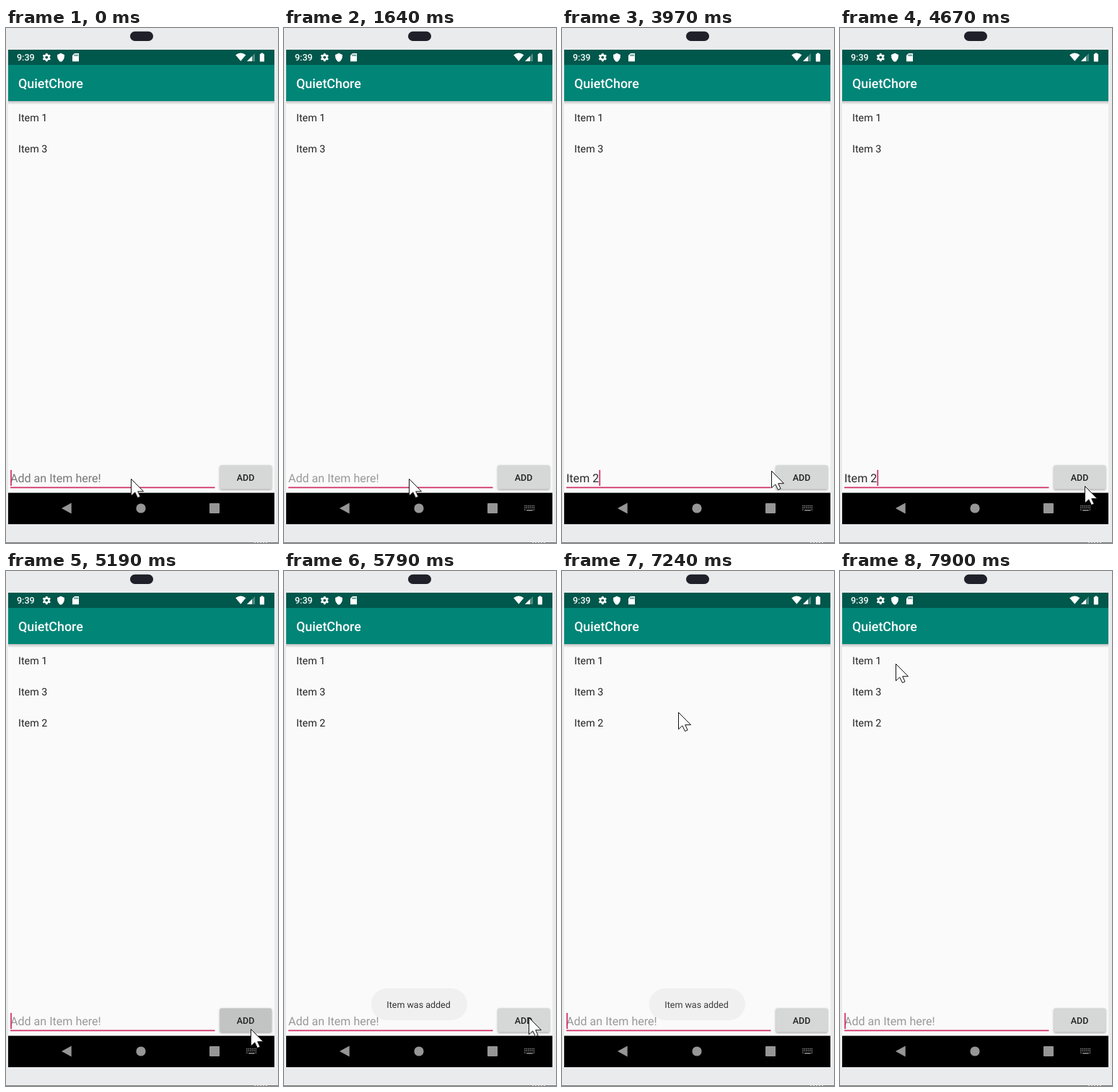
An HTML page with a canvas for the animation above (8 s loop, 377 by 712 pixels).

```html
<!DOCTYPE html>
<html lang="en">
<head>
<meta charset="utf-8">
<title>Todo list demo</title>
<style>
html, body { margin: 0; width: 100%; height: 100%; overflow: hidden; background: #eaebed; }
canvas { display: block; width: 377px; height: 712px; }
</style>
</head>
<body>
<canvas id="stage"></canvas>
<script>
const W = 377, H = 712, LOOP = 8000;
const canvas = document.getElementById('stage');
const ctx = canvas.getContext('2d');
const dpr = window.devicePixelRatio || 1;
canvas.width = W * dpr;
canvas.height = H * dpr;

const ACCENT = '#d02f62', GREY = '#969696';

// Event times in ms
const KEYBOARD = 150, TYPE = 1760, KEY_GAP = 140, DIGIT = 3640, TAP = 4890;
const ADDED = TAP + 300;
const BLINK = 500;
// The screen was sampled at a steady rate, so the pointer moves in steps.
const STEP = 132, PHASE = 110;

// Pointer route as [time, x, y]
const ROUTE = [
  [3450, 173, 623], [3720, 191, 611], [4090, 359, 612], [4590, 339, 633],
  [5660, 339, 633], [5786, 339, 617], [6046, 333, 453], [6310, 315, 320],
  [6710, 228, 249], [7898, 77, 128]
];

const clamp = v => Math.min(1, Math.max(0, v));
const mix = (a, b, k) => a + (b - a) * k;
// Rises over `fade` ms from `from` and falls back to 0 at `to`.
const pulse = (t, from, to, fade) => clamp((t - from) / fade) * clamp((to - t) / fade);

function pointerAt(t) {
  const s = Math.floor((t - PHASE) / STEP) * STEP + PHASE;
  const next = ROUTE.findIndex(key => key[0] > s);
  if (next === 0) return ROUTE[0].slice(1);
  if (next < 0) return ROUTE.at(-1).slice(1);
  const [t0, x0, y0] = ROUTE[next - 1], [t1, x1, y1] = ROUTE[next];
  const k = (s - t0) / (t1 - t0);
  return [Math.round(mix(x0, x1, k)), Math.round(mix(y0, y1, k))];
}

function typedAt(t) {
  if (t < TYPE || t >= ADDED) return '';
  if (t >= DIGIT) return 'Item 2';
  return 'Item '.slice(0, 1 + Math.floor((t - TYPE) / KEY_GAP));
}

// The caret restarts its blink on every key press and on the tap.
function caretOn(t) {
  const keys = Array.from('Item ', (_, i) => TYPE + i * KEY_GAP);
  const last = Math.max(...[0, ...keys, DIGIT, TAP].filter(key => key <= t));
  return Math.floor((t - last) / BLINK) % 2 === 0;
}

function rect(x, y, w, h, color) {
  ctx.fillStyle = color;
  ctx.fillRect(x, y, w, h);
}

function round(x, y, w, h, r, color) {
  ctx.fillStyle = color;
  ctx.beginPath();
  ctx.roundRect(x, y, w, h, r);
  ctx.fill();
}

function disc(x, y, r, color) {
  ctx.fillStyle = color;
  ctx.beginPath();
  ctx.arc(x, y, r, 0, Math.PI * 2);
  ctx.fill();
}

function poly(points, color) {
  ctx.fillStyle = color;
  ctx.beginPath();
  points.forEach(([x, y]) => ctx.lineTo(x, y));
  ctx.closePath();
  ctx.fill();
}

function text(str, x, y, size, color, weight = 400) {
  ctx.font = `${weight} ${size}px Roboto, sans-serif`;
  ctx.textRendering = 'geometricPrecision';
  ctx.fillStyle = color;
  ctx.fillText(str, x, y);
  return ctx.measureText(str).width;
}

function gear(x, y) {
  ctx.save();
  ctx.translate(x, y);
  for (let i = 0; i < 6; i++) {
    ctx.rotate(Math.PI / 3);
    poly([[-1.6, -3], [-1.2, -5.7], [1.2, -5.7], [1.6, -3]], '#fff');
  }
  ctx.restore();
  disc(x, y, 4.3, '#fff');
  disc(x, y, 1.9, '#00574b');
}

function shield(x, y) {
  ctx.fillStyle = '#fff';
  ctx.beginPath();
  ctx.moveTo(x, y - 6);
  ctx.lineTo(x + 5, y - 3.9);
  ctx.quadraticCurveTo(x + 5.2, y + 4, x, y + 6);
  ctx.quadraticCurveTo(x - 5.2, y + 4, x - 5, y - 3.9);
  ctx.fill();
}

function wifi(x, y) {
  ctx.fillStyle = '#fff';
  ctx.beginPath();
  ctx.moveTo(x, y);
  ctx.lineTo(x - 7.1, y - 8.6);
  ctx.quadraticCurveTo(x, y - 14.2, x + 7.1, y - 8.6);
  ctx.fill();
}

function statusBar() {
  rect(3, 30, 369, 21, '#00574b');
  text('9:39', 15, 45.3, 12.5, '#fff', 500);
  gear(56.3, 40.6);
  shield(76, 40.8);
  poly([[95, 35], [101, 35], [101, 46.3], [92, 46.3], [92, 38]], '#fff');
  for (let i = 0; i < 3; i++) rect(95 + i * 1.9, 36.5, 1, 2.4, '#00574b');
  wifi(325.3, 45.8);
  poly([[345, 35], [345, 46], [334, 46]], '#4d8981');
  poly([[341, 39], [341, 46], [334, 46]], '#fff');
  rect(353.4, 34.6, 3, 2, '#fff');
  round(351.8, 35.7, 6.2, 10.8, 0.8, '#fff');
}

function appBar() {
  rect(3, 51, 369, 50, '#008577');
  const shade = ctx.createLinearGradient(0, 101, 0, 106);
  shade.addColorStop(0, 'rgba(0,0,0,.24)');
  shade.addColorStop(1, 'rgba(0,0,0,0)');
  rect(3, 101, 369, 5, shade);
  text('QuietChore', 17, 83.2, 17.86, '#fff', 500);
}

function list(t) {
  const items = ['Item 1', 'Item 3'];
  if (t >= ADDED) items.push('Item 2');
  items.forEach((item, i) => text(item, 17, 128.6 + i * 43, 14.3, '#222'));
}

function inputRow(t) {
  const typed = typedAt(t);
  let caretX = 6.2;
  if (typed) caretX += text(typed, 6, 628.4, 16.07, '#2b2b2b');
  else text('Add an Item here!', 6, 628.4, 16.07, t < KEYBOARD ? '#777' : '#999');
  rect(6, 634.5, 283.5, 1.7, ACCENT);
  if (caretOn(t)) rect(caretX, 611, 1.7, 22, ACCENT);
}

function addButton(t) {
  const dim = 20 * pulse(t, TAP + 100, TAP + 540, 150);
  ctx.save();
  ctx.shadowColor = 'rgba(0,0,0,.35)';
  ctx.shadowBlur = 3 * dpr;
  ctx.shadowOffsetY = 1.3 * dpr;
  round(296.4, 604.5, 71.8, 33, 2, `rgb(${214 - dim},${215 - dim},${215 - dim})`);
  ctx.restore();
  text('ADD', 319.7, 626, 12.5, '#222', 500);
}

function keyboardIcon(x, y) {
  for (let i = 0; i < 12; i++) {
    rect(x + (i % 6) * 2.5, y + Math.floor(i / 6) * 2.7, 1.4, 1.4, GREY);
  }
  rect(x, y + 5.4, 1.4, 1.4, GREY);
  rect(x + 3, y + 6, 8.5, 1.5, GREY);
  rect(x + 12.5, y + 5.4, 1.4, 1.4, GREY);
}

function navBar(t) {
  rect(3, 642.6, 369, 43.4, '#000');
  poly([[77, 664], [90.7, 656.5], [90.7, 671.5]], GREY);
  disc(187, 664, 6.6, GREY);
  round(282, 657, 14, 14, 1, GREY);
  if (t >= KEYBOARD) keyboardIcon(333.2, 660);
}

function toast(t) {
  ctx.save();
  ctx.globalAlpha = pulse(t, ADDED, 7480, 250);
  round(120.7, 577, 133.3, 44, 22, '#f0f0f0');
  text('Item was added', 142.3, 604.3, 12.5, '#333');
  ctx.restore();
}

function pointer(x, y) {
  ctx.save();
  ctx.translate(x + 0.5, y + 0.5);
  poly([[0, 0], [0, 23.3], [5.3, 18.4], [9, 26], [12.6, 24.4], [9.2, 17.2], [17, 17.2]], '#fff');
  ctx.strokeStyle = '#111';
  ctx.lineWidth = 1;
  ctx.lineJoin = 'round';
  ctx.stroke();
  ctx.restore();
}

function draw(t) {
  ctx.setTransform(dpr, 0, 0, dpr, 0, 0);
  rect(0, 0, W, H, '#eaebed');
  round(172, 4.7, 32, 13.3, 6.6, '#1f2029');
  rect(3, 51, 369, 592, '#fafafa');
  statusBar();
  appBar();
  list(t);
  inputRow(t);
  addButton(t);
  navBar(t);
  toast(t);
  rect(0, 711, W, 1, '#777');
  for (let x = 344; x < 364; x += 4) rect(x, 711, 2, 1, '#ccc');
  pointer(...pointerAt(t));
}

const start = performance.now();
function tick() {
  draw((performance.now() - start) % LOOP);
  requestAnimationFrame(tick);
}
tick();
</script>
</body>
</html>
```
